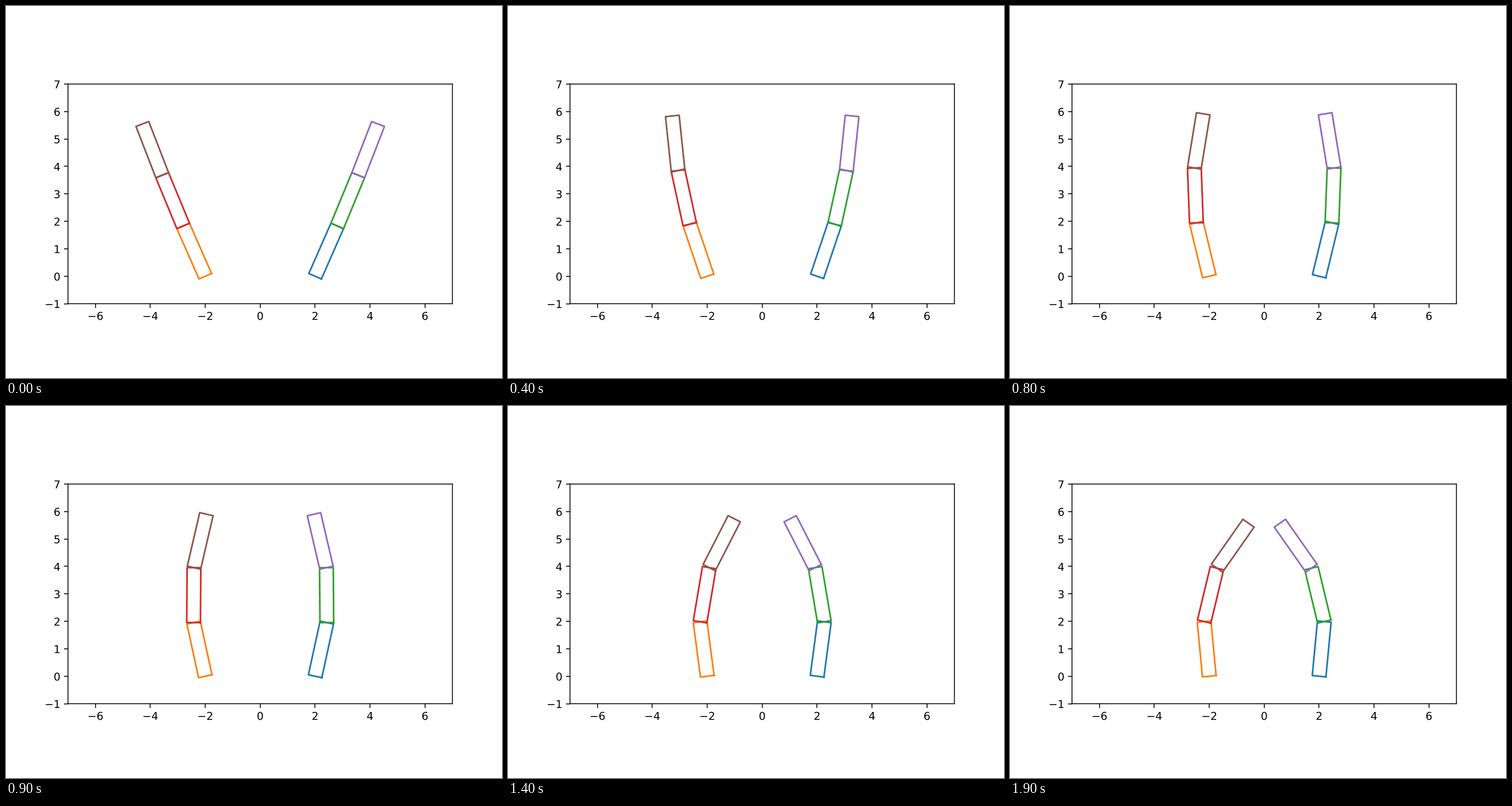
Animation of 864 by 648 pixels, one loop 2 s. Source, as a matplotlib script:

```python
import numpy as np
import matplotlib.pyplot as plt
from matplotlib.animation import FuncAnimation
from matplotlib.patheffects import Normal

FRAMES, INTERVAL = 20, 100
LENGTH, WIDTH, BASE = 2.0, 0.5, 2.0

# Joint angles in degrees: all joints bend evenly, then grip, then settle
LEAN = np.array([25, 0, 0])
STEP = 1.27
GRIP = np.array([3.85, 2.3, 4.1])
SETTLE = np.array([-0.75, 0.1, 0.9])


def phase(frame, start, end):
    return np.clip((frame - start) / (end - start), 0, 1)


def tilts(frame):
    """Tilt of each link from vertical, in radians."""
    grip = phase(frame, 12, 16) ** 2
    settle = 1 - (1 - phase(frame, 16, 19)) ** 2
    joints = LEAN - STEP * min(frame + 1, 13) - GRIP * grip - SETTLE * settle
    return np.radians(np.cumsum(joints))


def outline(x, y, tilt):
    """Closed box of one link standing on (x, y)."""
    u = np.array([1, 1, -1, -1, 1]) * WIDTH / 2
    v = np.array([0, 1, 1, 0, 0]) * LENGTH
    c, s = np.cos(tilt), np.sin(tilt)
    return x + u * c + v * s, y - u * s + v * c


def arm(side, frame):
    x, y = side * BASE, 0.0
    for tilt in side * tilts(frame):
        yield outline(x, y, tilt)
        x += LENGTH * np.sin(tilt)
        y += LENGTH * np.cos(tilt)


fig, ax = plt.subplots(figsize=(6.4, 4.8), dpi=135)
ax.set_aspect("equal")
ax.set_xlim(-7, 7)
ax.set_ylim(-1, 7)

# Keep the frame and labels at sub-pixel positions
for spine in ax.spines.values():
    spine.set_snap(False)
for label in ax.get_xticklabels() + ax.get_yticklabels():
    label.set_path_effects([Normal()])

# Right and left links alternate through the colour cycle
links = [ax.plot([], [], color=f"C{i}", lw=1.5)[0] for i in range(6)]


def update(frame):
    for offset, side in enumerate((1, -1)):
        for link, (x, y) in zip(links[offset::2], arm(side, frame)):
            link.set_data(x, y)
    return links


anim = FuncAnimation(fig, update, frames=FRAMES, interval=INTERVAL,
                     init_func=lambda: update(0), repeat=True, repeat_delay=0)
plt.show()
```
